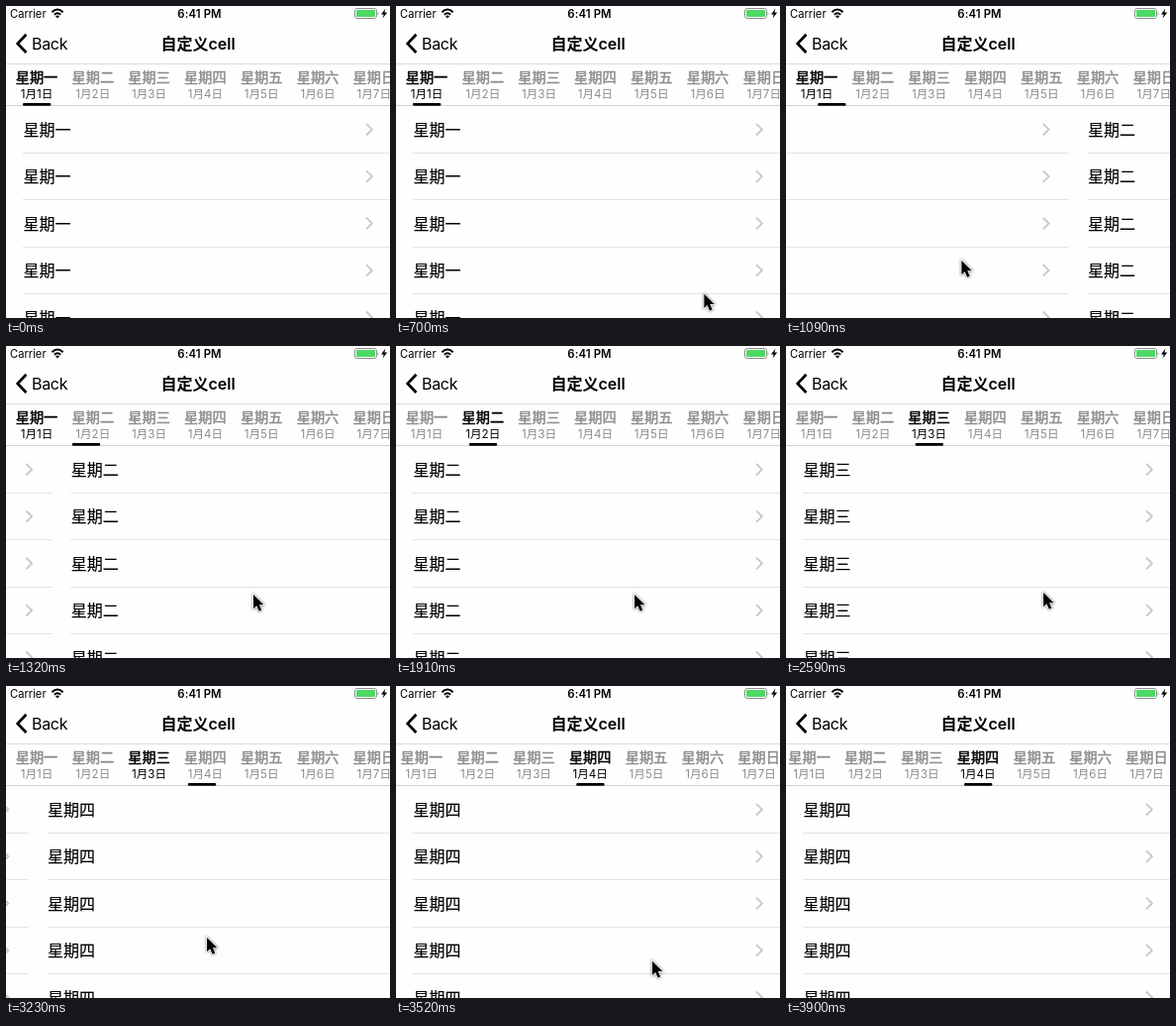
An HTML page that plays this animation: 388x315 px, repeating every 4.31 s.

```html
<!DOCTYPE html>
<html lang="zh">
<head>
<meta charset="utf-8">
<title>Weekday pager</title>
<style>
  html, body { margin: 0; width: 100%; height: 100%; overflow: hidden; background: #fefefe; }
  svg { display: block; width: 388px; height: 315px; font-family: Inter, "Noto Sans CJK SC", "Noto Sans CJK", sans-serif; }
  .row { font-size: 16px; fill: #000; stroke: #000; stroke-width: .15; }
  .tab { fill: #8c8c8c; stroke: #8c8c8c; stroke-width: 0; text-anchor: middle; }
  .tab.on { fill: #000; stroke: #000; }
  .day { font-size: 14.2px; stroke-width: .45; }
  .date { font-size: 11.6px; }
  .chevron { fill: none; stroke: #c7c7cc; stroke-width: 1.8; }
  .rule { fill: #e3e3e5; }
  #cursor { stroke: #fff; paint-order: stroke; stroke-width: 1.6; filter: drop-shadow(0 .6px .8px #0009); }
</style>
</head>
<body>
<svg viewBox="0 0 388 315">
  <rect width="388" height="315" fill="#fefefe"/>
  <g id="pages"></g>

  <rect y="58" width="388" height="1" fill="#dcdcde"/>
  <rect y="100" width="388" height="1" fill="#d3d3d5"/>
  <g id="tabs">
    <rect id="marker" x="17" y="98" width="28.4" height="2.8" rx="1.2"/>
  </g>

  <text x="4" y="12" font-size="11.2">Carrier</text>
  <path d="M46.4 6.2Q52 .9 57.6 6.2M48.8 8.7Q52 5.8 55.2 8.7" fill="none" stroke="#000" stroke-width="2"/>
  <path d="M50 10.2Q52 8.6 54 10.2L52 12.4Z"/>
  <text x="195.5" y="12" font-size="11.4" font-weight="600" letter-spacing=".1" text-anchor="middle">6:41 PM</text>
  <rect x="352.5" y="2.5" width="22" height="10" rx="2.4" fill="none" stroke="#8e8e8e"/>
  <rect x="354" y="4" width="19" height="7" rx="1" fill="#4cd964"/>
  <path d="M375.6 5.5q1.6 2 0 4z" fill="#8e8e8e"/>
  <path d="M383.4 2.5L379 8.4h2.7L380.6 12.6 385.2 6.6h-2.8z"/>

  <path d="M20.4 28.8L11.8 37.9 20.4 47" fill="none" stroke="#000" stroke-width="2.8"/>
  <text x="26" y="43.6" font-size="16" letter-spacing="-.3">Back</text>
  <text x="194" y="43.6" font-size="16" font-weight="600" text-anchor="middle">自定义cell</text>

  <path id="cursor" d="M0 0V14.2L3.2 11.2 5.7 16.8 8.3 15.7 5.9 10.2H10.4Z"/>
</svg>
<script>
  const LOOP = 4310, PAGE = 392, TAB = 56.8, TAB_SCROLL = 7.4;
  const weekdays = [...'一二三四五六日'].map(c => '星期' + c);

  const swipes = [
    { start: 915, duration: 520 },
    { start: 1915, duration: 520 },
    { start: 2858, duration: 440 },
  ];
  const tabScroll = { start: 3330, duration: 300 };

  // Pointer turning points, eased between
  const pointer = [
    { t: 560, x: 330, y: 311 }, { t: 900, x: 280, y: 257 },
    { t: 1140, x: 165, y: 257 }, { t: 1320, x: 250, y: 251 },
    { t: 1790, x: 250, y: 251 }, { t: 1910, x: 241, y: 251 },
    { t: 2140, x: 130, y: 254 }, { t: 2560, x: 260, y: 249 },
    { t: 2840, x: 264, y: 250 }, { t: 3050, x: 150, y: 253 },
    { t: 3230, x: 203, y: 254 }, { t: 3900, x: 342, y: 313 },
  ];

  const $ = id => document.getElementById(id);
  const move = (node, x, y = 0) => node.setAttribute('transform', `translate(${x} ${y})`);

  function add(parent, tag, attrs, text = '') {
    const node = document.createElementNS('http://www.w3.org/2000/svg', tag);
    for (const key in attrs) node.setAttribute(key, attrs[key]);
    node.textContent = text;
    return parent.appendChild(node);
  }

  // Eased progress from 0 to 1
  function progress(t, { start, duration }) {
    const u = Math.min(1, Math.max(0, (t - start) / duration));
    return u * u * (3 - 2 * u);
  }

  const tabs = weekdays.map((day, i) => {
    const tab = add($('tabs'), 'g', { class: 'tab' });
    const x = 31 + TAB * i;
    add(tab, 'text', { class: 'day', x, y: 77.2 }, day);
    add(tab, 'text', { class: 'date', x, y: 92.6 }, `1月${i + 1}日`);
    return tab;
  });

  weekdays.slice(0, swipes.length + 1).forEach((day, i) => {
    const page = add($('pages'), 'g', {});
    move(page, PAGE * i);
    for (let row = 0; row < 5; row++) {
      const y = 124.7 + 47.4 * row;
      add(page, 'text', { class: 'row', x: 17.4, y: y + 6.3 }, day);
      add(page, 'path', { class: 'chevron', d: `M364 ${y - 5.8}l5.9 5.8-5.9 5.8` });
      add(page, 'rect', { class: 'rule', x: 17, y: Math.floor(y + 23.55), width: 373, height: 1 });
    }
  });

  function drawPointer(t) {
    const next = pointer.findIndex(p => p.t > t);
    $('cursor').style.display = next > 0 ? '' : 'none';
    if (next < 1) return;
    const a = pointer[next - 1], b = pointer[next];
    const k = progress(t, { start: a.t, duration: b.t - a.t });
    move($('cursor'), a.x + (b.x - a.x) * k, a.y + (b.y - a.y) * k);
  }

  function draw(t) {
    const turns = swipes.map(swipe => progress(t, swipe));
    const position = turns.reduce((a, b) => a + b);
    const selected = turns.filter(p => p === 1).length;

    move($('pages'), -PAGE * position);
    move($('marker'), TAB * position);
    move($('tabs'), -TAB_SCROLL * progress(t, tabScroll));
    tabs.forEach((tab, i) => tab.classList.toggle('on', i === selected));
    drawPointer(t);
  }

  const begin = performance.now();
  function frame() {
    draw((performance.now() - begin) % LOOP);
    requestAnimationFrame(frame);
  }
  frame();
</script>
</body>
</html>
```
